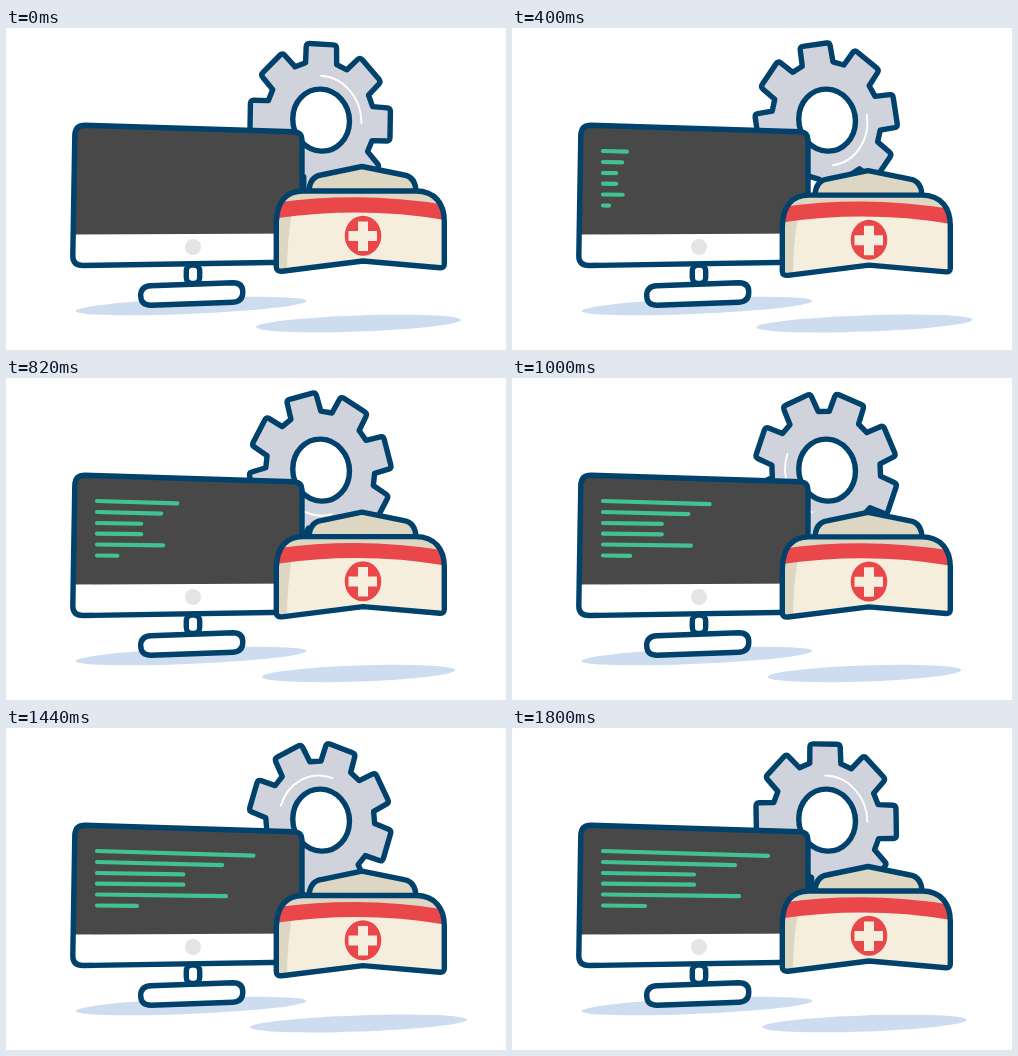
An HTML page for the animation above (1.82 s loop, 500 by 322 pixels).

```html
<!DOCTYPE html>
<html lang="en">
<head>
<meta charset="utf-8">
<title>Computer, gear and nurse cap</title>
<style>
html, body { margin: 0; width: 100%; height: 100%; overflow: hidden; background: #fff; }
svg { display: block; width: 500px; height: 322px; }
.ink { stroke: #00426c; stroke-width: 5.4; stroke-linejoin: round; vector-effect: non-scaling-stroke; }
.white { fill: #fff; }
.shadow { fill: #cddcef; }
.cream { fill: #f5eedc; }
.tan { fill: #dcd6c3; }
.red { fill: #e94749; }
#code { stroke: #41c391; stroke-width: 4.2; stroke-linecap: round; }
</style>
</head>
<body>
<svg viewBox="0 0 500 322">
  <defs>
    <path id="case" d="M79 97.2 L288 103.8 Q296 104.3 296 112 V234 L77 237.5 Q66.800 237.5 66.800 228 L68.800 107 Q69.300 97.2 79 97.2 Z"/>
    <path id="cap" d="M270.3 239 V194 C271 174 280 163 297 163 H410 C429 163 438.3 176 438.3 193 V236 Q438.3 240 434 239.7 L357 233 L276 243.2 Q270.3 243.7 270.3 239 Z"/>
    <clipPath id="capClip"><use href="#cap"/></clipPath>
  </defs>

  <ellipse class="shadow" cx="185" cy="278" rx="115.500" ry="7.800" transform="rotate(-2.5 185 278)"/>
  <ellipse id="capShadow" class="shadow" cx="352.5" cy="295.5" ry="8.100" transform="rotate(-2 352.5 295.5)"/>

  <g transform="matrix(.915 .035 0 1 314.2 92.6)">
    <path id="teeth" class="ink" fill="#d0d3dc"/>
    <circle class="ink white" cx="1" cy="-.5" r="31"/>
    <path id="shine" d="M0 -45 A45 45 0 0 1 45 0" fill="none" stroke="#fff" stroke-width="2" stroke-linecap="round"/>
  </g>

  <rect class="ink white" x="180.3" y="237" width="13.400" height="18.500" rx="6"/>
  <path class="ink white" d="M145 257.800 L227 254.800 Q236.800 254.800 236.800 264 Q236.800 273.700 227 274.2 L145 277.2 Q134.700 277.2 134.700 267.5 Q134.700 258.3 145 257.800 Z"/>
  <use href="#case" class="white"/>
  <path fill="#484848" d="M67.3 206.5 L68.800 107 Q69.300 97.2 79 97.2 L288 103.8 Q296 104.3 296 112 V205.5 Z"/>
  <use href="#case" class="ink" fill="none"/>
  <circle cx="187" cy="219" r="8" fill="#e4e4e4"/>
  <g id="code"></g>

  <g id="hat">
    <path class="ink tan" d="M303 165 Q303 149 315 147 L356 138.500 L398 147 Q410 149 410 165 Z"/>
    <use href="#cap" class="cream"/>
    <g clip-path="url(#capClip)">
      <path class="tan" d="M265 160 H445 V180 Q357 164 265 178 Z"/>
      <path class="tan" d="M265 185 H286 Q281 212 281 246 H265 Z"/>
      <path class="red" d="M265 175.500 Q357 162 445 178 V193 Q357 177 265 191 Z"/>
    </g>
    <use href="#cap" class="ink" fill="none"/>
    <ellipse class="red" cx="357" cy="207.700" rx="18.300" ry="20"/>
    <path class="cream" d="M352 193.500 H362 V203 H371 V213 H362 V223 H352 V213 H342.500 V203 H352 Z"/>
  </g>
</svg>
<script>
const LOOP = 1820, STEP = 20, TYPING = 1670;
const get = id => document.getElementById(id);

// One tooth with rounded tips, repeated around the gear
const tooth = [
  ["L", -17, -57], ["L", -16.6, -73], ["Q", -16.5, -76.5], ["", -13, -76.5],
  ["L", 13, -76.5], ["Q", 16.5, -76.5], ["", 16.6, -73], ["L", 17, -57]
];
let outline = "";
for (let i = 0; i < 8; i++) {
  const c = Math.cos(i * Math.PI / 4), s = Math.sin(i * Math.PI / 4);
  for (const [cmd, x, y] of tooth) outline += `${cmd} ${x * c - y * s} ${x * s + y * c} `;
}
get("teeth").setAttribute("d", outline.replace("L", "M") + "Z");

// Start y, full length and drop of each code line
const rows = [
  [123, 165, 4.8], [134, 132, 3.2], [145, 91, 1.5],
  [155.7, 91, 1], [166.5, 136, 1.7], [177.5, 42, 0.5]
].map(([y, length, drop]) => {
  const line = document.createElementNS("http://www.w3.org/2000/svg", "line");
  line.setAttribute("x1", 91);
  line.setAttribute("y1", y);
  get("code").append(line);
  return { line, y, length, drop };
});

function draw(now) {
  // The extra millisecond absorbs clock rounding at step edges
  const t = Math.floor((now + 1) % LOOP / STEP) * STEP;
  const p = Math.min(t / TYPING, 1);
  const typed = p * p * (3 - 2 * p);
  const bob = Math.sin(2 * Math.PI * t / 1200);
  const spin = `rotate(${1 + 360 * t / 1810})`;

  get("teeth").setAttribute("transform", spin);
  get("shine").setAttribute("transform", spin);
  get("hat").setAttribute("transform", `translate(0 ${4.8 * bob})`);
  get("capShadow").setAttribute("rx", 102.5 + 6.5 * bob);
  get("code").style.display = t ? "" : "none";
  for (const { line, y, length, drop } of rows) {
    line.setAttribute("x2", 91 + length * typed);
    line.setAttribute("y2", y + drop * typed);
  }
}

const start = performance.now();
function tick() {
  draw(performance.now() - start);
  requestAnimationFrame(tick);
}
tick();
</script>
</body>
</html>
```
